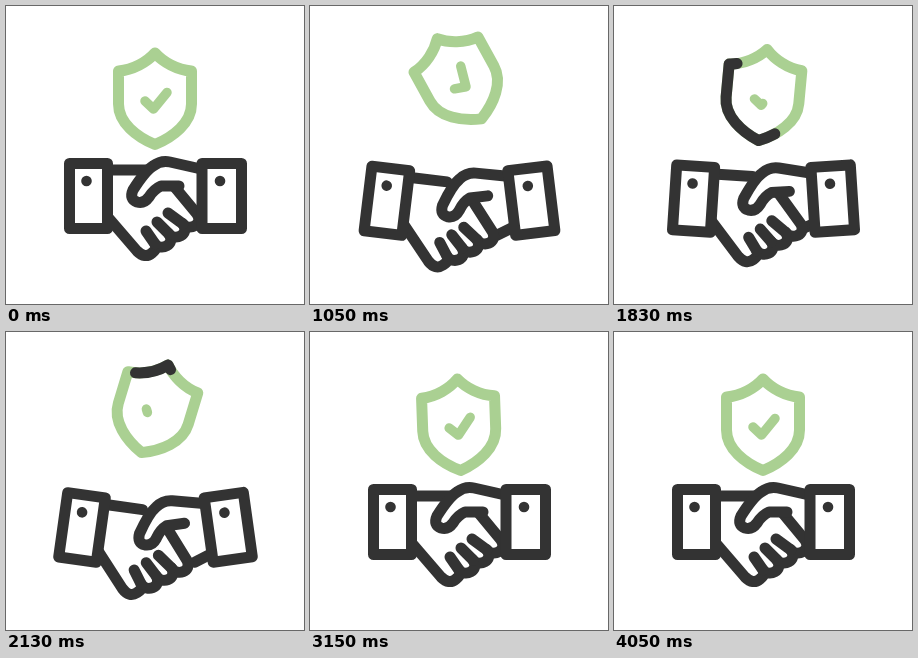
Write an HTML page that moves like this. It is 298 px wide and 298 px high and loops after 4.23 s.

```html
<!DOCTYPE html>
<html lang="en">
<head>
<meta charset="utf-8">
<title>Handshake and shield</title>
<style>
  html, body { margin: 0; width: 100%; height: 100%; overflow: hidden; background: #fff; }
  svg { display: block; width: 100%; height: 100%; }
  path, rect { stroke-width: 11; stroke-linecap: round; stroke-linejoin: round; }
  .dark { stroke: #333; fill: #fff; }
  .green { stroke: #aad092; fill: none; }
  .line { fill: none; }
  circle { fill: #333; }
  #tick { stroke-width: 9.5; }
</style>
</head>
<body>
<svg viewBox="0 0 298 298">
  <g class="right"><path class="dark line" d="M178 220L195 214"/></g>
  <g class="left">
    <path id="palm" class="dark"/>
    <path id="gaps" class="dark line"/>
  </g>
  <g class="right">
    <path class="dark" d="M195 163L164 156Q155 154 147 160Q139 165 127 184Q123 193 131 196Q138 198 143 191Q148 183 155 180L173 180"/>
    <rect class="dark" x="196" y="157.5" width="39.5" height="65"/>
    <circle cx="214" cy="175" r="5.3"/>
  </g>
  <g class="left">
    <rect class="dark" x="63.5" y="157.5" width="38" height="65"/>
    <circle cx="80.5" cy="175" r="5.3"/>
  </g>
  <g id="shield">
    <path id="rim" class="green"/>
    <path id="sweep" class="dark line" pathLength="1"/>
    <path id="tick" class="green" pathLength="1" d="M139 95L147.5 103L161 86.5"/>
  </g>
</svg>
<script>
const LOOP = 4230;
const $ = id => document.getElementById(id);
const lefts = document.querySelectorAll('.left');
const rights = document.querySelectorAll('.right');

const rim = 'M149 47c8 9 22 17 36.5 18v33c0 19-18.500 33-36.500 40.500c-18-7.500-36.500-21.500-36.500-40.500v-33c14.500-1 28.500-9 36.500-18';
$('rim').setAttribute('d', rim);
$('sweep').setAttribute('d', rim);

// Three equal fingers step up and to the right from the first one.
let palm = 'M100 209L131 245Q139 253 146 247Q152 242 149 238';
let gaps = 'M101 164H140';
for (let i = 0; i < 3; i++) {
  palm += 'c6 7 21 1 14-10';
  gaps += `M${140 + 11 * i} ${225 - 9 * i}L${149 + 14 * i} ${238 - 10 * i}`;
}
$('palm').setAttribute('d', palm + 'L167 179');
$('gaps').setAttribute('d', gaps);

const ease = x => (1 - Math.cos(Math.PI * Math.min(1, Math.max(0, x)))) / 2;

// Rises from 0 to 1 at the peak and falls back to 0.
const hop = (t, from, peak, to) =>
  ease((t - from) / (peak - from)) * ease((to - t) / (to - peak));

const tilt = t =>
  -30 * hop(t, 200, 1170, 2160) + 17 * hop(t, 1170, 2160, 2940)
  - 4 * hop(t, 2160, 2940, 3510) + 2.5 * hop(t, 2940, 3510, 3930);

function turn(el, angle, x, y) {
  el.setAttribute('transform', `rotate(${angle} ${x} ${y})`);
}

function trim(el, from, to, gap) {
  const length = to - from;
  el.style.visibility = length > .002 ? 'visible' : 'hidden';
  el.setAttribute('stroke-dasharray', `${length} ${gap}`);
  el.setAttribute('stroke-dashoffset', -from);
}

function draw(t) {
  const first = hop(t, 0, 900, 1530);
  const second = hop(t, 1530, 2160, 2880);
  const shake = 8 * (first + second);
  lefts.forEach(el => turn(el, shake, 40, 146));
  rights.forEach(el => turn(el, -shake, 257, 146));

  const lift = 7 * hop(t, 900, 1530, 2160) - 24 * first - 16 * second;
  $('shield').setAttribute('transform', `translate(0 ${lift}) rotate(${tilt(t)} 149 92)`);

  // The dark stroke may wrap past the tip of the shield.
  const tail = ease((t - 1391) / 989), head = ease((t - 1090) / 989);
  trim($('sweep'), tail + .02, head + .02, 1 - head + tail);

  // The tick swings ahead of the shield's own turn with a short lag.
  turn($('tick'), tilt(t - 150), 149, 95);
  const cut = hop(t, 1200, 2180, 3000);
  trim($('tick'), .1 * cut, 1 - .8 * cut, 2);
}

const start = performance.now();
(function frame() {
  draw((performance.now() - start) % LOOP);
  requestAnimationFrame(frame);
})();
</script>
</body>
</html>
```
